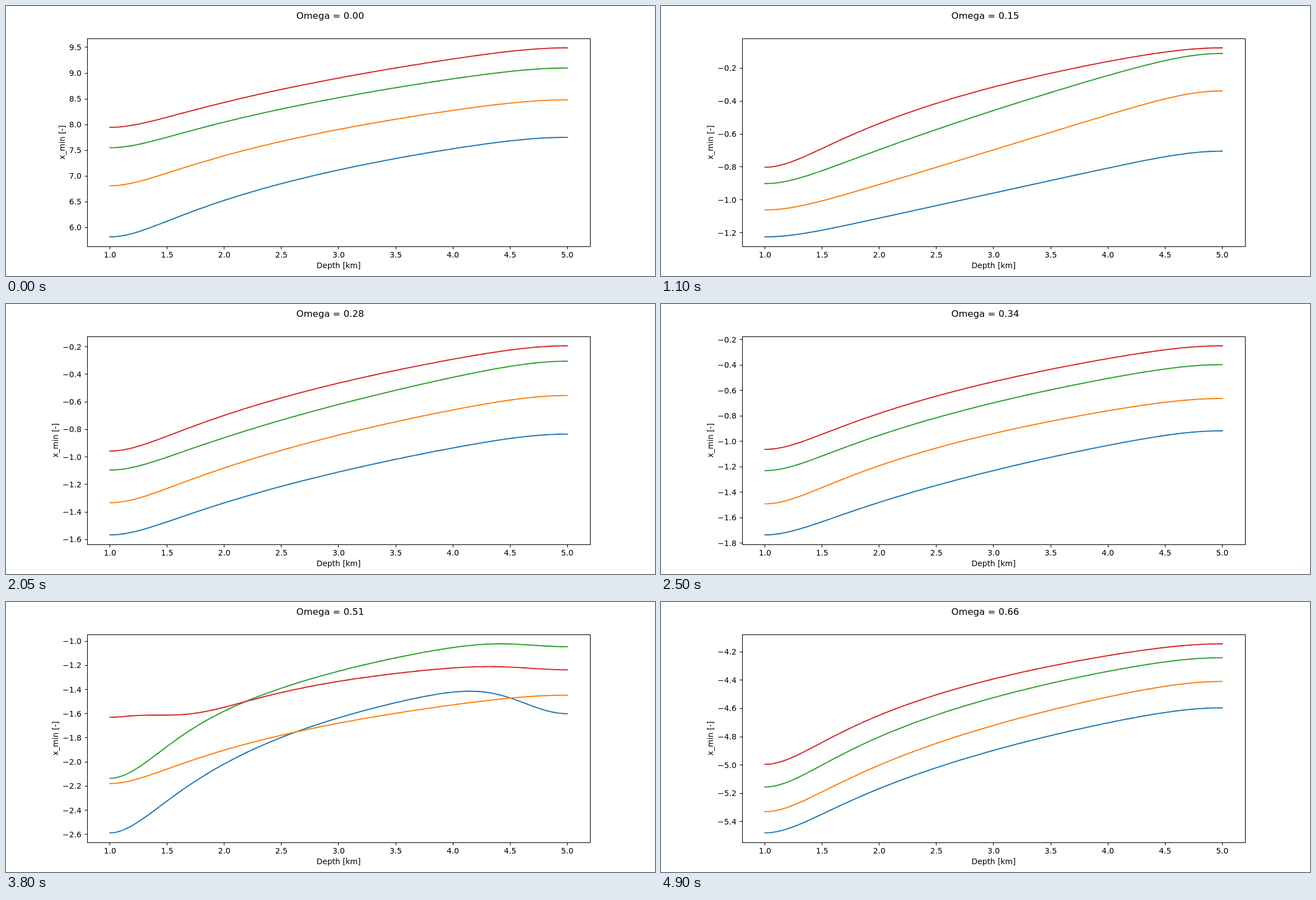
Animation of 1159 by 483 pixels, one loop 4.95 s. Source, as an HTML page:

```html
<!DOCTYPE html>
<html lang="en">
<head>
<meta charset="utf-8">
<title>x_min over depth</title>
<style>
  html, body { margin: 0; width: 100%; height: 100%; overflow: hidden; background: #fff; }
  svg { display: block; width: 100%; height: 100%; }
  text { font: 13.89px "DejaVu Sans", Verdana, sans-serif; fill: #000; text-anchor: middle; }
  #title { font-size: 16.5px; }
  #yTicks text { text-anchor: end; }
  .axis { fill: none; stroke: #000; stroke-width: 1.11; }
  #curves path { fill: none; stroke-width: 2.08; stroke-linecap: square; stroke-linejoin: round; }
</style>
</head>
<body>
<svg viewBox="0 0 1159 483">
  <text id="title" x="579" y="23"></text>
  <g id="xTicks"></g>
  <g id="yTicks"></g>
  <g id="curves"></g>
  <rect class="axis" x="145.5" y="58.5" width="898" height="372"/>
  <text x="594" y="468.5">Depth [km]</text>
  <text id="yLabel">x_min [-]</text>
</svg>
<script>
const STEP_MS = 50, STEPS = 99, SAMPLES = 160;
const PLOT = { left: 185.7, unit: 204.14, top: 57.96, bottom: 429.87 };
const COLORS = ['#1f77b4', '#ff7f0e', '#2ca02c', '#d62728'];
const DEPTH = { min: 1, max: 5 };

const curve = (start, end, bend, left = 0, right = 0) => ({ start, end, bend, left, right });

const atRest = [
  curve(5.82, 7.752, 1.03), curve(6.813, 8.48, 0.92),
  curve(7.551, 9.098, 0.74), curve(7.947, 9.49, 0.69)
];

// Poses between which the curves glide once Omega is above zero.
const poses = [
  { at: 22, curves: [
    curve(-1.225, -0.704, 0), curve(-1.061, -0.338, -0.04),
    curve(-0.901, -0.11, 0.32), curve(-0.802, -0.076, 1.03)] },
  { at: 32, curves: [
    curve(-1.398, -0.752, 0.75), curve(-1.175, -0.446, 0.52),
    curve(-0.961, -0.213, 0.34), curve(-0.852, -0.138, 0.8)] },
  { at: 50, curves: [
    curve(-1.734, -0.916, 0.68), curve(-1.49, -0.662, 1),
    curve(-1.229, -0.396, 0.82), curve(-1.062, -0.248, 0.91)] },
  { at: 61, curves: [
    curve(-2.065, -1.113, 0.92), curve(-1.769, -0.82, 0.93),
    curve(-1.486, -0.494, 0.73), curve(-1.296, -0.31, 0.9)] },
  { at: 76, curves: [
    curve(-2.586, -1.3, 1.5, 0, -0.3), curve(-2.178, -1.447, 1.1),
    curve(-2.04, -0.95, 1.4, -0.094, -0.096), curve(-2, -1.17, 2, 0.37, -0.067)] },
  { at: 98, curves: [
    curve(-5.479, -4.596, 0.95), curve(-5.329, -4.41, 0.97),
    curve(-5.155, -4.242, 1.16), curve(-4.995, -4.144, 1.28)] }
];

const $ = id => document.getElementById(id);
const dx = (DEPTH.max - DEPTH.min) / SAMPLES;
const depths = Array.from({ length: SAMPLES + 1 }, (_, i) => DEPTH.min + dx * i);
const lerp = (a, b, u) => a + (b - a) * u;
const bell = x => Math.exp(-x * x / 0.32);

function add(parent, tag, attrs) {
  const el = document.createElementNS('http://www.w3.org/2000/svg', tag);
  for (const name in attrs) el.setAttribute(name, attrs[name]);
  return parent.appendChild(el);
}

// The slope falls as a power of depth and fades to zero at both ends;
// left and right lift the curve near its ends.
function sample({ start, end, bend, left, right }) {
  let sum = 0;
  const rise = depths.map((d, i) => {
    if (i === 0) return 0;
    const mid = d - dx / 2;
    const fade = Math.tanh((mid - DEPTH.min) / 0.37) * Math.tanh((DEPTH.max - mid) / 0.48);
    return sum += fade * mid ** -bend;
  });
  return depths.map((d, i) => lerp(start, end, rise[i] / sum)
    + left * bell(d - DEPTH.min) + right * bell(DEPTH.max - d));
}

function curvesAt(step) {
  if (step === 0) return atRest;
  const next = Math.max(1, poses.findIndex(p => p.at >= step));
  const a = poses[next - 1], b = poses[next];
  let u = (step - a.at) / (b.at - a.at);
  if (u < 0) u *= 0.03; // slow drift before the first pose
  return a.curves.map((c, n) => {
    const mixed = {};
    for (const key in c) mixed[key] = lerp(c[key], b.curves[n][key], u);
    return mixed;
  });
}

for (let d = DEPTH.min; d <= DEPTH.max; d += 0.5) {
  const x = PLOT.left + PLOT.unit * (d - DEPTH.min);
  add($('xTicks'), 'path', { class: 'axis', d: `M${Math.floor(x) + 0.5} 430.5v4.9` });
  add($('xTicks'), 'text', { x, y: 450 }).textContent = d.toFixed(1);
}
const yTicks = Array.from({ length: 11 }, () => {
  const group = add($('yTicks'), 'g', {});
  return {
    group,
    mark: add(group, 'path', { class: 'axis' }),
    label: add(group, 'text', { x: 134.8 })
  };
});
const paths = COLORS.map(stroke => add($('curves'), 'path', { stroke }));

function draw(step) {
  const lines = curvesAt(step).map(sample);
  const all = lines.flat();
  const min = Math.min(...all), max = Math.max(...all);
  const pad = (max - min) * 0.05;
  const lo = min - pad, hi = max + pad;
  const toY = v => lerp(PLOT.top, PLOT.bottom, (hi - v) / (hi - lo));

  lines.forEach((line, n) => paths[n].setAttribute('d', 'M' + line.map((v, i) =>
    (PLOT.left + PLOT.unit * dx * i).toFixed(2) + ' ' + toY(v).toFixed(2)).join('L')));

  const gap = [0.1, 0.2, 0.25, 0.5, 1].find(g => g >= (hi - lo) / 9);
  const digits = gap === 0.25 ? 2 : 1;
  const first = Math.ceil(lo / gap), last = Math.floor(hi / gap);
  yTicks.forEach((tick, i) => {
    const n = first + i;
    tick.group.style.display = n > last ? 'none' : '';
    if (n > last) return;
    const y = toY(n * gap);
    tick.mark.setAttribute('d', `M145.5 ${Math.floor(y) + 0.5}h-4.9`);
    tick.label.setAttribute('y', Math.round(y) + 5);
    tick.label.textContent = (n < 0 ? '\u2212' : '') + Math.abs(n * gap).toFixed(digits);
  });

  // The axis label keeps clear of the widest tick label.
  const labelX = 104.8 - (lo < 0 ? 11.64 : 0) - (digits - 1) * 8.84;
  $('yLabel').setAttribute('transform', `translate(${labelX} 244) rotate(-90)`);
  $('title').textContent = 'Omega = ' + (step * 0.00675).toFixed(2);
}

let shown = -1;
const begin = performance.now();
function tick() {
  const step = Math.floor((performance.now() - begin) / STEP_MS) % STEPS;
  if (step !== shown) draw(shown = step);
  requestAnimationFrame(tick);
}
tick();
</script>
</body>
</html>
```
